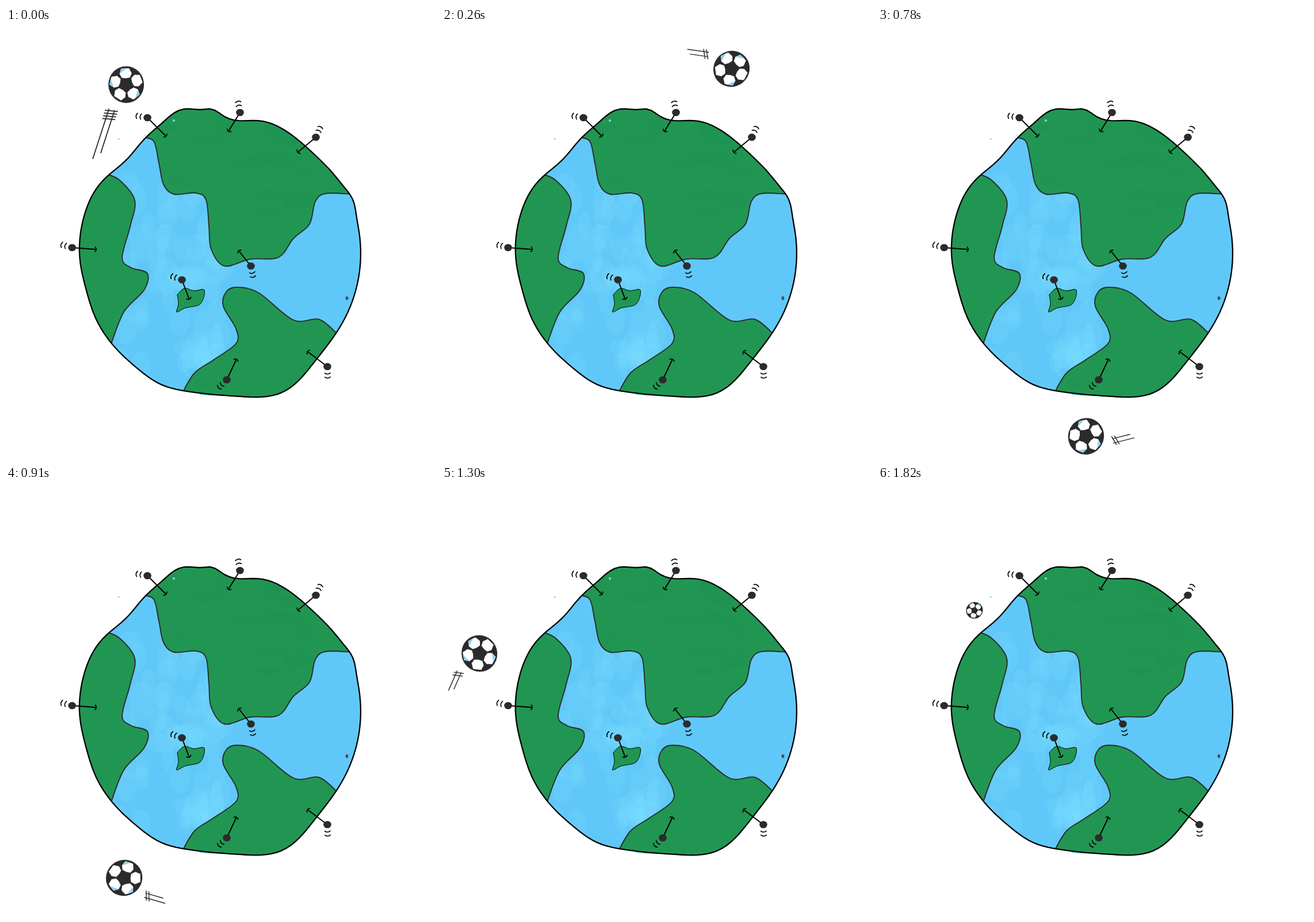
Write an HTML page with a canvas that moves like this. It is 748 px wide and 748 px high and loops after 1950 ms.

```html
<!DOCTYPE html>
<html lang="en">
<head>
<meta charset="utf-8">
<title>Ball around the globe</title>
<style>
html, body { margin: 0; width: 100%; height: 100%; overflow: hidden; background: #fff; }
canvas { display: block; width: 100vw; height: 100vh; }
</style>
</head>
<body>
<canvas id="stage" width="748" height="748"></canvas>
<script>
const SIZE = 748, STEP = 130, STEPS = 15, LAST_ORBIT_STEP = 10, BALL_RADIUS = 31.5;
const INK = '#2b2b2b', GREEN = '#219653', BLUE = '#60c8f8', PALE = '#8fd3ea';
const CENTER = { x: 372, y: 392 };
const stage = document.getElementById('stage').getContext('2d');
const globe = document.createElement('canvas');
globe.width = globe.height = SIZE;

const rad = deg => deg * Math.PI / 180;
const mix = (a, b, p) => a + (b - a) * p;
const points = text => text.split(' ').map(p => p.split(',').map(Number));
const polar = (r, deg, x = 0, y = 0) => [x + r * Math.cos(rad(deg)), y + r * Math.sin(rad(deg))];

let seed = 7;
const random = () => (seed = seed * 16807 % 2147483647) / 2147483647;

// Catmull-Rom curve through the given points.
function spline(pts) {
  const path = new Path2D(), at = i => pts[Math.max(0, Math.min(pts.length - 1, i))];
  path.moveTo(...pts[0]);
  for (let i = 0; i < pts.length - 1; i++) {
    const [a, b, c, d] = [at(i - 1), at(i), at(i + 1), at(i + 2)];
    path.bezierCurveTo(b[0] + (c[0] - a[0]) / 6, b[1] + (c[1] - a[1]) / 6,
      c[0] - (d[0] - b[0]) / 6, c[1] - (d[1] - b[1]) / 6, c[0], c[1]);
  }
  return path;
}

// A circle with hand-drawn bulges and dents: direction, height, width.
const bumps = points('-105,14,8 -93,8,4 -83,-12,9 -47,-7,16 -22,5,6 66,20,15 114,5,10 165,-4,12 225,-15,13');
const globeRadius = deg => bumps.reduce((r, [at, height, width]) => {
  const away = (deg - at + 540) % 360 - 180;
  return r + height * Math.exp(-((away / width) ** 2));
}, 245);

const outline = new Path2D();
for (let deg = 0; deg < 360; deg += 2) outline.lineTo(...polar(globeRadius(deg), deg, CENTER.x, CENTER.y));
outline.closePath();

const island = spline(points('298,464 310,453 327,457 345,456 338,480 312,487 297,494 300,480 298,464'));

const coasts = [
  '236,190 257,197 266,235 274,272 292,289 330,287 348,299 353,345 357,385 380,414 425,402 474,399 500,366 528,341 538,302 556,288 602,289',
  '172,253 198,265 224,300 216,345 202,400 218,417 246,427 240,456 205,494 182,552',
  '306,636 328,600 360,578 400,549 400,523 378,484 383,459 402,451 440,461 500,508 545,507 580,536'
].map(points);

function landArea(coast) {
  const area = new Path2D(spline(coast));
  for (const [x, y] of [coast[coast.length - 1], coast[0]])
    area.lineTo(mix(CENTER.x, x, 3), mix(CENTER.y, y, 3));
  area.closePath();
  return area;
}

// Head x, y, tip x, y, and the direction of the wiggle marks.
const pins = points('246,156,277,187,190 407,147,388,178,-100 539,190,509,215,-65 115,382,155,385,195 426,414,406,389,78 306,438,318,470,200 384,612,400,578,135 559,589,526,564,88');

function dot(ctx, x, y, r, color, ry = r) {
  ctx.fillStyle = color;
  ctx.beginPath();
  ctx.ellipse(x, y, r, ry, 0, 0, 2 * Math.PI);
  ctx.fill();
}

function bow(ctx, x, y, r, deg, spread) {
  ctx.beginPath();
  ctx.arc(x, y, r, rad(deg - spread), rad(deg + spread));
  ctx.stroke();
}

// Uneven brushwork: faint overlapping daubs inside a box.
function daubs(ctx, color, count, [x, y, w, h], rx, ry) {
  for (let i = 0; i < count; i++)
    dot(ctx, x + w * random(), y + h * random(), rx * mix(0.4, 1, random()), color, ry * mix(0.4, 1, random()));
}

function drawPin(ctx, [x, y, tipX, tipY, side]) {
  const lean = Math.atan2(tipY - y, tipX - x) * 180 / Math.PI;
  ctx.lineWidth = 2;
  ctx.beginPath();
  ctx.moveTo(x, y);
  ctx.lineTo(tipX, tipY);
  ctx.stroke();
  dot(ctx, x, y, 6.8, INK, 6.3);
  ctx.lineWidth = 1.7;
  bow(ctx, ...polar(-3, lean, tipX, tipY), 5, lean, 55);
  for (const distance of [13, 20]) bow(ctx, ...polar(distance - 7, side, x, y), 7, side, 42);
}

function paintGlobe(ctx) {
  ctx.fillStyle = '#fff';
  ctx.fillRect(0, 0, SIZE, SIZE);
  ctx.lineCap = ctx.lineJoin = 'round';
  dot(ctx, 359, 637, 23, PALE, 2.5);

  ctx.save();
  ctx.clip(outline);
  ctx.fillStyle = BLUE;
  ctx.fill(outline);
  daubs(ctx, 'rgba(125,222,255,.14)', 70, [200, 270, 180, 330], 22, 34);
  ctx.strokeStyle = INK;
  ctx.lineWidth = 1.9;
  for (const coast of coasts) {
    const area = landArea(coast);
    ctx.save();
    ctx.clip(area);
    ctx.fillStyle = GREEN;
    ctx.fill(area);
    daubs(ctx, 'rgba(18,128,68,.07)', 24, [290, 150, 240, 190], 36, 14);
    ctx.restore();
    ctx.stroke(spline(coast));
  }
  ctx.restore();

  ctx.fillStyle = GREEN;
  ctx.fill(island);
  ctx.stroke(island);
  ctx.lineWidth = 2.3;
  ctx.stroke(outline);
  pins.forEach(pin => drawPin(ctx, pin));

  dot(ctx, 196, 193, 1.5, PALE);
  dot(ctx, 292, 161, 2, PALE);
  dot(ctx, 593, 470, 2.4, '#544a50', 3.2);
}

function patch(ctx, color, corners) {
  ctx.fillStyle = color;
  ctx.beginPath();
  corners.forEach(([r, deg]) => ctx.lineTo(...polar(r, deg)));
  ctx.fill();
}

function drawBall(ctx, { x, y, turn, size }) {
  ctx.save();
  ctx.translate(x, y);
  ctx.rotate(rad(turn));
  ctx.scale(size, size);
  dot(ctx, 0, 0, 31, INK, 32);
  for (let k = 0; k < 5; k++) {
    ctx.save();
    ctx.rotate(rad(72 * k - 92));
    patch(ctx, '#fff', [[14, -31], [22, -30], [29, -16], [29, 12], [22, 28], [14, 30], [11, 0]]);
    if (k % 2 === 0) patch(ctx, PALE, [[22, -28], [29, -16], [29, 5]]);
    ctx.restore();
  }
  ctx.restore();
}

// Two speed lines running backwards, crossed by short strokes at the front.
function drawTrail(ctx, x, y, angle, length) {
  const gap = 3 + length / 45;
  ctx.save();
  ctx.translate(x, y);
  ctx.rotate(rad(angle));
  ctx.strokeStyle = INK;
  ctx.lineWidth = 1.2 + length / 150;
  ctx.beginPath();
  for (const side of [-gap, gap]) {
    ctx.moveTo(0, side);
    ctx.lineTo(length * (side < 0 ? 0.85 : 1), side);
  }
  for (let s = 2; s < 4 + length / 7; s += 5) {
    ctx.moveTo(s - 2, -gap * 2.2);
    ctx.lineTo(s + 3, gap * 2.2);
  }
  ctx.stroke();
  ctx.restore();
}

// Polar keyframes around the middle of the orbit.
const ORBIT = { x: 385, y: 380 };
const keys = [
  { step: 0, angle: -122, radius: 332, turn: 0 },
  { step: 2, angle: -69, radius: 331, turn: 50 },
  { step: 4, angle: -8, radius: 328, turn: 110 },
  { step: 5, angle: 30, radius: 343, turn: 152 },
  { step: 6, angle: 94, radius: 331, turn: 208 },
  { step: 8, angle: 147.5, radius: 371, turn: 268 },
  { step: 10, angle: 195.5, radius: 332, turn: 336 },
  { step: 14, angle: 217, radius: 272, turn: 410 }
];

function ballAt(step) {
  const next = keys.findIndex(key => key.step > step);
  const to = keys[next < 0 ? keys.length - 1 : next], from = keys[keys.indexOf(to) - 1];
  const p = (step - from.step) / (to.step - from.step);
  const [x, y] = polar(mix(from.radius, to.radius, p), mix(from.angle, to.angle, p), ORBIT.x, ORBIT.y);
  const sunk = Math.max(0, step - LAST_ORBIT_STEP) / (STEPS - 1 - LAST_ORBIT_STEP);
  return { x, y, turn: mix(from.turn, to.turn, p), size: mix(1, 14.5 / BALL_RADIUS, sunk) };
}

function render(now) {
  const step = Math.floor(Math.max(0, now - start) / STEP) % STEPS;
  const ball = ballAt(step), { x, y, turn } = ball;
  stage.drawImage(globe, 0, 0);
  if (step === 0) drawTrail(stage, ...polar(50, 120, x, y), 108, 92);
  else if (step <= LAST_ORBIT_STEP) drawTrail(stage, ...polar(47, turn + 162, x, y), turn + 138, 38);
  drawBall(stage, ball);
  requestAnimationFrame(render);
}

paintGlobe(globe.getContext('2d'));
const start = performance.now();
render(start);
</script>
</body>
</html>
```
